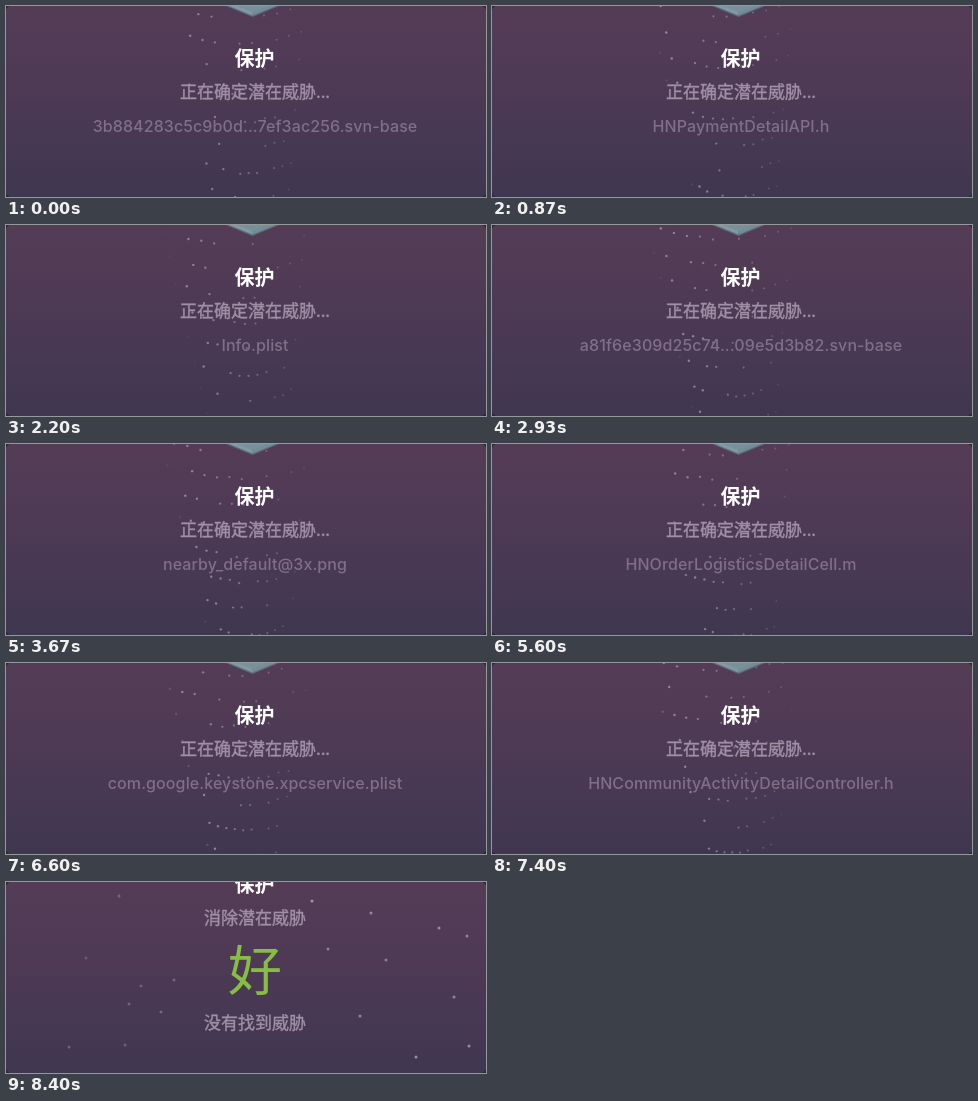
Recreate the animation shown at these times as an HTML page with a canvas. Size 480 px wide and 191 px high, loop 8470 ms.

```html
<!DOCTYPE html>
<html lang="zh-CN">
<head>
<meta charset="utf-8">
<style>
  html, body { margin: 0; width: 100%; height: 100%; overflow: hidden; background: #2b2536; }
  #stage {
    position: relative; width: 480px; height: 191px; overflow: hidden; border-radius: 5px;
    background: linear-gradient(#543c55 0%, #4f3a55 35%, #473853 70%, #3f374f 100%);
  }
  canvas, #panel { position: absolute; left: 0; top: 0; }
  #panel { width: 480px; height: 300px; }
  svg { position: absolute; left: 0; top: 0; }
  .line {
    position: absolute; left: -1px; width: 500px; height: 30px; line-height: 30px;
    text-align: center; white-space: nowrap;
    font: 500 17px/30px "Noto Sans CJK SC", "Noto Sans CJK", sans-serif;
    color: #a08fa5; -webkit-text-stroke: 0.4px;
  }
  #title { left: -1.5px; top: 36.5px; font-size: 20px; font-weight: 700; color: #fff; -webkit-text-stroke: 0; }
  #status { top: 70px; }
  #file { top: 105px; font: 500 16px/30px Inter, sans-serif; letter-spacing: 0.1px; color: #826f87; -webkit-text-stroke: 0; }
  #good { top: 106px; height: 60px; font-size: 54px; line-height: 60px; font-weight: 300; color: #87bd43; -webkit-text-stroke: 0; }
  #result { top: 175px; }
</style>
</head>
<body>
<div id="stage">
  <canvas id="dots" width="480" height="191"></canvas>
  <div id="panel">
    <svg width="480" height="20">
      <path d="M220 0L246.5 11L273 0Z" fill="#5b6c79"/>
      <path d="M223 0L246.5 9.5V0Z" fill="#8199a2"/>
      <path d="M270 0L246.5 9.5V0Z" fill="#748c97"/>
      <path d="M231 0L246.5 6L262 0Z" fill="#78909a"/>
    </svg>
    <div class="line" id="title">保护</div>
    <div class="line" id="status"></div>
    <div class="line" id="file"></div>
    <div class="line" id="good">好</div>
    <div class="line" id="result">没有找到威胁</div>
  </div>
</div>
<script>
const LOOP = 8470, STEP = LOOP / 127, END = 7860;
const $ = id => document.getElementById(id);
const ctx = $('dots').getContext('2d');

const files = [
  [0, '3b884283c5c9b0d...7ef3ac256.svn-base'],
  [600, 'HNPaymentDetailAPI.h'],
  [1130, '5d02c9e47b81a36...c40b8f197.svn-base'],
  [1670, 'HNHomeBannerCell.m'],
  [2070, 'Info.plist'],
  [2400, 'a81f6e309d25c74...09e5d3b82.svn-base'],
  [3130, 'icon_close@2x.png'],
  [3530, 'nearby_default@3x.png'],
  [3930, '72c6b0e58f9d143...e8a0457c3.svn-base'],
  [4390, 'HNVIPMemberVC.h'],
  [4870, 'c09e4a7d35b2861...52d8b6e04.svn-base'],
  [5260, 'HNOrderLogisticsDetailCell.m'],
  [5730, 'HNOrderListCell.h'],
  [6120, '9e35d7b80c4a612...b73f0d8a5.svn-base'],
  [6460, 'com.google.keystone.xpcservice.plist'],
  [6990, 'HNCommunityActivityDetailController.h'],
  [7460, 'Localizable.strings']
];

const stars = [
  [113, 14], [306, 19], [365, 31], [433, 46], [461, 54], [322, 67], [380, 78], [80, 76], [168, 98],
  [135, 104], [448, 115], [123, 122], [155, 130], [354, 134], [119, 163], [63, 165], [463, 164], [410, 175]
];

const clamp = v => Math.max(0, Math.min(1, v));
const easeOut = v => 1 - (1 - clamp(v)) ** 3;
const noise = n => { const v = Math.sin(n * 127.1) * 43758.5453; return v - Math.floor(v); };

function dot(x, y, r, alpha) {
  ctx.globalAlpha = alpha;
  ctx.beginPath();
  ctx.arc(x, y, r, 0, 7);
  ctx.fill();
}

// Curved rows of dots drift across a sheet that narrows downward and dims to the right.
function funnel(t, fade) {
  const rows = 9, cols = 12, gap = 26;
  for (let i = 0; i < rows; i++) {
    const base = (i * gap + t / LOOP * rows * gap) % (rows * gap) - 30;
    const center = 232 + base * 0.07, half = 78 - base * 0.18;
    for (let j = 0; j < cols; j++) {
      const seed = noise(i * cols + j + 1);
      if (seed > 0.55) continue;
      const u = (j + t / LOOP * cols) % cols / cols;
      const edge = clamp(Math.min(u, 1 - u) * 10);
      const x = center + half * (2 * u - 1);
      const y = base + 14 * Math.sin(Math.PI * u) + seed * 5;
      dot(x, y, 1.25 - 0.3 * u, fade * edge * (0.5 - 0.36 * u));
    }
  }
}

function starField(k) {
  const spread = 0.8 + 0.2 * k;
  stars.forEach(([x, y], i) =>
    dot(249 + (x - 249) * spread, 95 + (y - 95) * spread, 1.5, k * (x < 249 ? 0.25 : 0.48) * (0.8 + 0.4 * noise(i + 3))));
}

function draw(now) {
  const t = Math.floor((now % LOOP + 5) / STEP) * STEP;
  const done = t >= END;
  const k = easeOut((t - END) / 460);

  $('panel').style.transform = `translateY(${-50 * k}px)`;
  $('status').textContent = done ? '消除潜在威胁' : '正在确定潜在威胁...';
  $('file').textContent = done ? '' : files.filter(f => f[0] <= t).pop()[1];
  $('good').style.opacity = $('result').style.opacity = k;

  ctx.clearRect(0, 0, 480, 191);
  ctx.fillStyle = '#e6dbea';
  if (k < 1) funnel(t, 1 - k);
  if (done) starField(k);
}

const start = performance.now();
function tick() {
  draw(performance.now() - start);
  requestAnimationFrame(tick);
}
tick();
</script>
</body>
</html>
```
